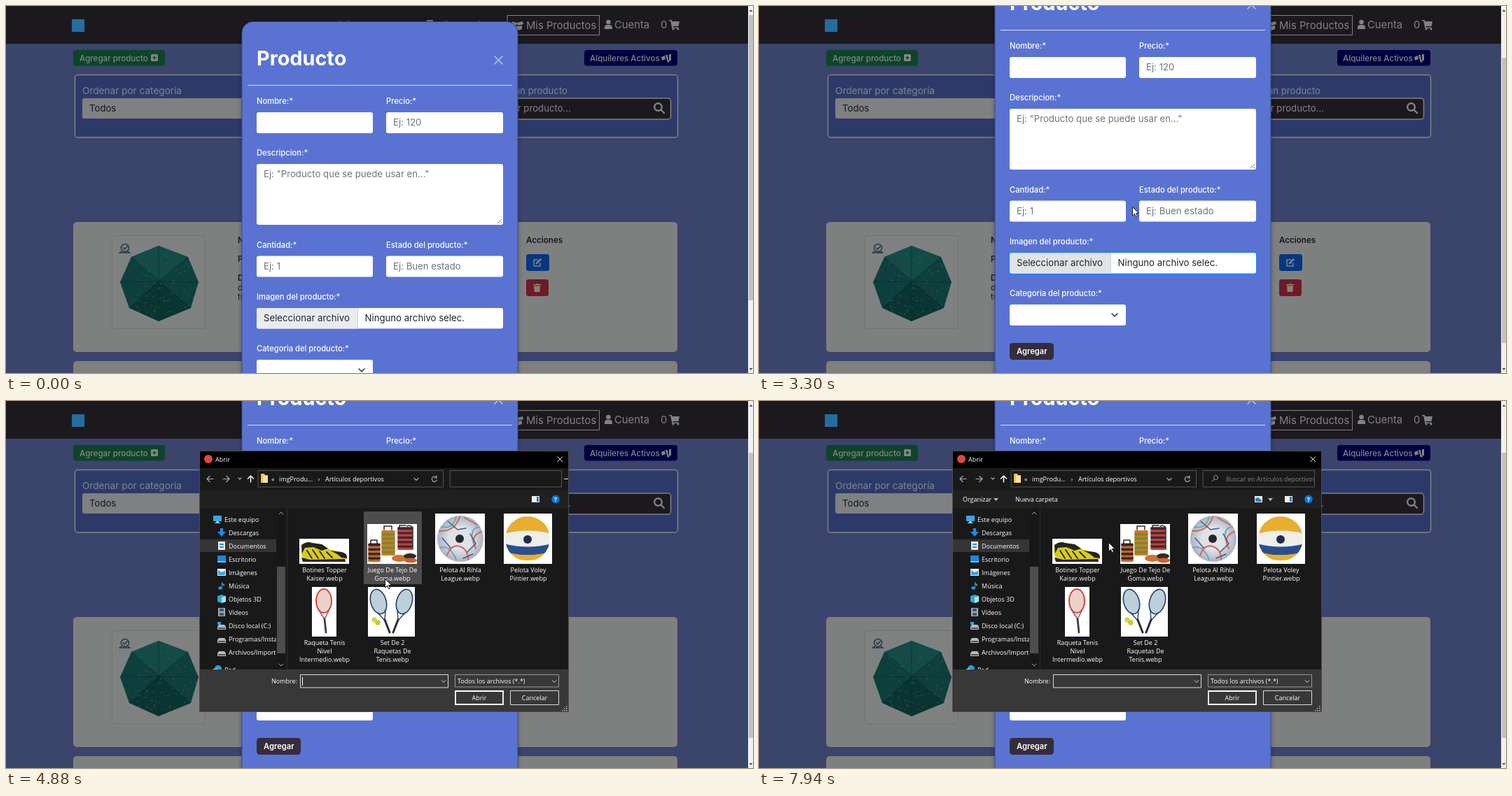
An HTML page for the animation above (8 s loop, 1067 px wide and 525 px high).

```html
<!DOCTYPE html>
<html lang="es">
<head>
<meta charset="utf-8">
<title>Producto</title>
<style>
  html, body { margin: 0; width: 100%; height: 100%; overflow: hidden; background: #3b446b; }
  svg { display: block; }
  text { font-family: Inter, sans-serif; white-space: pre; }
  .nav { font-size: 14.8px; fill: #828183; }
  .pill { font-size: 11.6px; font-weight: 500; fill: #848585; }
  .body { font-size: 13.2px; }
  .label { font-size: 11.2px; font-weight: 500; fill: #fff; }
  .strong { font-size: 11.2px; font-weight: 600; }
  .dialog text { font-family: "Open Sans", sans-serif; font-size: 9px; fill: #fff; }
  .dialog .mid { text-anchor: middle; }
  .line { fill: none; stroke-linecap: round; stroke-linejoin: round; }
</style>
</head>
<body>
<svg width="1067" height="525" viewBox="0 0 1067 525">
  <defs>
    <clipPath id="treeClip"><path d="M277 153h109v231H277z"/></clipPath>
    <clipPath id="searchClip"><path d="M635 99h158v24H635z"/></clipPath>
    <clipPath id="canopy"><path d="M218 343l42 16 15 36-11 37-46 19-42-19-13-37 16-36z"/></clipPath>
    <clipPath id="volleyball"><circle cx="745" cy="197" r="32"/></clipPath>
    <radialGradient id="sphere"><stop offset=".5" stop-color="#dfe2e8"/><stop offset="1" stop-color="#aab1c0"/></radialGradient>
    <filter id="shadow" x="-10%" y="-10%" width="120%" height="120%">
      <feDropShadow dx="0" dy="0" stdDeviation="3" flood-opacity=".35"/>
    </filter>
  </defs>

  <!-- dimmed page -->
  <path fill="#3b446b" d="M0 0h1067v525H0z"/>
  <path fill="#1c191e" d="M0 0h1067v54H0z"/>
  <path fill="#246d9e" d="M94 19h18v18H94z"/>
  <g class="nav">
    <text x="463" y="33">Inicio</text><text x="517" y="33">Productos</text>
    <path d="M601 20h9v14h-9z"/><text x="614" y="33">Mis Alquileres</text>
    <path class="line" stroke="#828183" d="M716.5 13.500h131v28h-131z"/>
    <path d="M723 22l7 2 8-2 1 4-7 2-2-2-2 2-6-2zM725 28l5 1 1-1 1 1 5-1v5l-6 2-6-2z"/>
    <text x="743" y="32.500">Mis Productos</text>
    <circle cx="860.500" cy="23" r="3.300"/><path d="M855 33v-2q0-4 4-4h3q4 0 4 4v2z"/>
    <text x="869" y="32">Cuenta</text><text x="935" y="32">0</text>
    <path d="M947 20h4l.5 2H962l-1.500 7h-8l.3 1.500h8V32h-9.500l-2-10.500h-2z"/>
    <circle cx="953" cy="33" r="1.500"/><circle cx="960" cy="33" r="1.500"/>
  </g>

  <rect x="96" y="63" width="131" height="22.500" rx="4" fill="#0d442a"/>
  <text class="pill" x="105" y="78.500">Agregar producto</text>
  <rect x="207" y="69" width="10" height="10" rx="1.500" fill="#848585"/>
  <path stroke="#0d442a" stroke-width="1.400" d="M212 71.500v5M209.500 74h5"/>
  <rect x="826" y="63" width="133" height="22.500" rx="4" fill="#000040"/>
  <text class="pill" x="834" y="78.500">Alquileres Activos</text>
  <path fill="#848585" d="M936 73l5-2 1 5-5 2zM942 70h3l1 8h-2zM947 69h3v9h-3z"/>
  <circle cx="946" cy="79" r="1.700" fill="#848585"/>

  <rect x="98.500" y="98.500" width="861" height="89.500" rx="4" fill="#2d3a69" stroke="#808285" stroke-width="1.500"/>
  <g class="body">
    <text x="109" y="125.500" fill="#828590" font-size="13.600">Ordenar por categoría</text>
    <rect x="109" y="132" width="340" height="29" rx="3" fill="#7f8081"/>
    <text x="119" y="150.500" fill="#15171a">Todos</text>
    <text x="802" y="125.500" text-anchor="end" fill="#828590">Buscar un producto</text>
    <rect x="640" y="132" width="309.500" height="30" rx="4" fill="#1b181e" stroke="#808184" stroke-width="1.500"/>
    <text x="807" y="151" text-anchor="end" fill="#848486">Buscar producto...</text>
  </g>
  <g class="line" stroke="#848486" stroke-width="2.400"><circle cx="931.500" cy="144.500" r="5.300"/><path d="M936 149l4 4"/></g>

  <g fill="#7e8080">
    <rect x="96" y="309" width="863" height="186" rx="5"/>
    <rect x="96" y="508" width="863" height="30" rx="5"/>
  </g>
  <rect x="151.500" y="328.500" width="133" height="133" rx="3" fill="#7f8181" stroke="#6f7172"/>
  <g clip-path="url(#canopy)">
    <path fill="#0c3f3e" d="M160 340h120v115H160z"/>
    <path fill="#134b48" d="M218 393l-39-34 39-16 42 16z"/>
    <path fill="#083433" d="M218 393l46 39-46 19-42-19z"/>
    <g id="dots"></g>
    <path class="line" stroke="#082e2f" stroke-width=".7" d="M218 343v108M260 359l-84 73M275 395l-112-1M264 432l-85-73"/>
  </g>
  <g class="line" stroke="#243a48" stroke-width="1.500">
    <circle cx="170" cy="346" r="5.500"/><path d="M167.500 346l2 2 3.500-4M165 351l-3 2h15l-3-2"/>
  </g>
  <g class="strong" fill="#15171a">
    <text x="331" y="339">Nombre:</text><text x="331" y="366">Precio:</text><text x="331" y="393">Descripción:</text>
    <text x="743" y="339" font-size="11.600">Acciones</text>
    <g font-weight="400"><text x="331" y="407">de</text><text x="331" y="420">tu</text></g>
  </g>
  <rect x="743" y="355" width="33" height="24" rx="3.500" fill="#07377f"/>
  <g class="line" stroke="#808489" stroke-width="1.500"><path d="M759 363h-5v9h9v-4"/><path stroke-width="2.500" d="M758 368l5.500-5.500"/></g>
  <rect x="743" y="391" width="32" height="24" rx="3.500" fill="#6e1b23"/>
  <path fill="#858081" d="M753 398h4l1-1h2l1 1h3v1.500h-11zM754 400.500h9l-.7 8.500h-7.600z"/>

  <!-- product form -->
  <g id="modal">
    <rect x="337" y="22.500" width="394" height="640" rx="16" fill="#5a73d2" stroke="#394a8b" filter="url(#shadow)"/>
    <text x="358" y="85" font-size="28.800" font-weight="700" fill="#fff">Producto</text>
    <path class="line" stroke="#bdc8ee" stroke-width="1.500" d="M698 72l11 11M709 72l-11 11"/>
    <path stroke="#d5dcf4" d="M345 113.500h378"/>
    <g id="fields"></g>
    <path stroke="#666" stroke-width=".9" d="M702 311l6-6M706 311l2-2"/>
    <rect id="focusRing" x="355.500" y="429.500" width="357" height="34.500" rx="5" fill="#2f7cf8"/>
    <rect x="358" y="432" width="352" height="29.500" rx="3" fill="#fff"/>
    <path id="fileButton" d="M502 432H361q-3 0-3 3v23.500q0 3 3 3h141z"/>
    <path stroke="#ced4da" d="M502.500 432v29.500"/>
    <g class="body" fill="#212529"><text x="368" y="451">Seleccionar archivo</text><text x="512.500" y="451">Ninguno archivo selec.</text></g>
    <path class="line" stroke="#343a40" stroke-width="1.600" d="M504 519l4 4 4-4"/>
    <rect x="358" y="561" width="63" height="24" rx="4.500" fill="#352d3a"/>
    <text class="strong" x="368" y="577" fill="#fff">Agregar</text>
  </g>

  <path fill="#f1f1f1" d="M1060 0h7v525h-7z"/>
  <path id="thumb" fill="#c1c1c1" d="M1061 13h6v408h-6z"/>
  <path fill="#505050" d="M1061.500 8l2.500-3 2.500 3zM1061.500 518l2.500 3 2.500-3z"/>

  <!-- file picker -->
  <g id="dialog" class="dialog">
    <path fill="#202020" stroke="#4b4b4b" d="M276.500 71.500h527v373h-527z"/>
    <path fill="#000" d="M277 72h526v24H277z"/>
    <circle cx="289" cy="83" r="6" fill="#db4b3f"/>
    <text x="299" y="87">Abrir</text>
    <path stroke="#fff" d="M787.500 79.500l7.500 7.500M795 79.500l-7.500 7.500"/>
    <path fill="#383838" d="M277 384h526v60H277z"/>
    <path id="blank" fill="#fff" d="M277 96h526v288H277zM379 394h37v12h-37zM420 391h212v19H420zM641 391h149v18H641zM641 414h70v21h-70zM720 414h70v21h-70zM790 431h13v13h-13z"/>
    <g id="content">
      <path fill="#191919" d="M277 96h526v32H277zM277 153h526v231H277z"/>
      <g class="line" stroke="#aaa" stroke-width="1.200">
        <path d="M296 111.500h-9l4-4m-4 4l4 4M310 111.500h9l-4-4m4 4l-4 4M332 110l2 2 2-2M583 110.500l3 3 3-3"/>
        <path stroke="#fff" stroke-width="1.500" d="M349.500 116v-9l-4 4m4-4l4 4"/>
        <path stroke="#555" stroke-width="1" d="M360.500 99.500h264v23.500h-264zM634.500 99.500h159v23.500h-159z"/>
        <path d="M615 109.500a3.700 3.700 0 1 0 .5 3.500M615 107v3h-3"/>
      </g>
      <path fill="#efc24d" d="M364 104h5l1 2h4v11h-10z"/><path fill="#ffe194" d="M367 107h7v10h-7z"/>
      <text x="379" y="114.500">«</text><text x="390" y="114.500">imgProdu...</text><text x="445.500" y="114.500">›</text>
      <text x="456" y="114.500">Artículos deportivos</text>
      <path fill="#eee" d="M751 136h11v9h-11z"/><path fill="#2980c8" d="M758 137h3v7h-3z"/>
      <circle cx="785" cy="140.500" r="5.800" fill="#0878d8"/><text class="mid" x="785" y="144" font-weight="700">?</text>
      <path id="dash" stroke="#ddd" d="M797 111.500h6"/>
      <g id="toolbar">
        <text x="291" y="144">Organizar</text><path fill="#bbb" d="M335 139h7l-3.500 4zM727 139h7l-3.500 4z"/>
        <text x="366" y="144">Nueva carpeta</text>
        <path fill="#eee" d="M708 136h11v9h-11z"/><path fill="#2980c8" d="M709 139l4-1 5 4v2h-9z"/>
        <g class="line" stroke="#999"><circle cx="652.500" cy="109.500" r="3"/><path d="M650 112l-3 3"/></g>
        <g clip-path="url(#searchClip)"><text x="667" y="114.500" style="fill:#858585">Buscar en Artículos deportivos</text></g>
      </g>
      <path fill="#353535" d="M277 198h109v18H277z"/>
      <g id="tree" clip-path="url(#treeClip)"></g>
      <path fill="#171717" d="M387 153h12v231h-12z"/><path fill="#4d4d4d" d="M387 237h12v124h-12z"/>
      <path class="line" stroke="#aaa" d="M390 162l3-3 3 3M390 376l3 3 3-3"/>
      <path stroke="#2b2b2b" d="M401.500 153v231"/>
      <path id="hover" fill="#4d4d4d" d="M414 158h83v104h-83z"/>

      <path fill="#fff" d="M419 197h71v36h-71zM516 176h71v57h-71zM613 161h71v72h-71zM711 161h69v72h-69zM437 266h35v71h-35zM517 266h67v71h-67z"/>

      <!-- football boot -->
      <path fill="#d8cc1c" d="M422 206q8-6 15-3l14 2q12 10 28 11 9 2 8 9l-3 4h-58q-6-9-4-23z"/>
      <path fill="#24251f" d="M422 206q8-6 15-3l14 2 9 6-9 3-12-5-12 1-4 8zM463 214l16 2q9 2 8 9l-8-1q-6-6-16-10zM422 224l12 3 50-1 1 4h-61z"/>
      <path class="line" stroke="#24251f" stroke-width="1.800" d="M430 214l7 11M438 213l8 12M448 215l7 10M458 216l8 8"/>

      <!-- disc stacks -->
      <g id="discs"></g>
      <path class="line" stroke="#2b2727" stroke-width="1.500" d="M521 205v-6h9v6M540 184v-5h11v5M581 212v-31q-3-4-8-2M562 181v-3h9"/>
      <ellipse cx="562" cy="225" rx="11" ry="5" fill="#cf7430"/><ellipse cx="577" cy="222" rx="9" ry="4" fill="#302a29"/>
      <ellipse cx="578" cy="228" rx="9" ry="3.500" fill="#c9622d"/>

      <!-- balls -->
      <circle cx="649" cy="197" r="33" fill="url(#sphere)"/>
      <g class="line" stroke-width="2">
        <path stroke="#6aa9c4" d="M622 180q16 4 21-14M676 180q-14 2-9 21M620 210q14-5 23 17"/>
        <path stroke="#cf6a50" d="M619 186q22 1 29-20M679 187q-17 6-8 24M630 221q6-17 18-13t12 19M655 167l18 10"/>
        <path stroke="#4c5680" stroke-width="1.500" d="M631 172l14 12 12-2M623 196l12 14M663 190l8 14-12 12M653 225l14-6"/>
      </g>
      <circle cx="648" cy="197" r="6" fill="#252729"/>
      <g clip-path="url(#volleyball)">
        <path fill="#eeeeea" d="M711 161h69v72h-69z"/>
        <path fill="#e8ae2f" d="M711 161h69v29q-35-9-69 0z"/>
        <path fill="#2b4f8e" d="M711 204q34 9 69 0v12q-35 9-69 0z"/>
        <path fill="#e8ae2f" d="M718 217q27 7 54 0l-8 9q-19 4-38 0z"/>
        <path class="line" stroke="#c3b48e" stroke-width=".7" d="M725 164q-6 12-5 23M766 164q6 12 5 23"/>
      </g>
      <circle cx="745" cy="198" r="6" fill="#202b4e"/>

      <!-- rackets -->
      <g class="line">
        <ellipse cx="454" cy="286" rx="11" ry="17" fill="#ecd0ca" stroke="#cb4c42" stroke-width="2"/>
        <path stroke="#b84844" stroke-width="1.500" d="M446 298l9 14 7-14"/><path stroke="#343f58" stroke-width="2.800" d="M455 312l2 19"/>
        <g id="racket">
          <ellipse cx="532" cy="287" rx="11" ry="18" transform="rotate(-16 532 287)" fill="#bdd0d9" stroke="#2b466f" stroke-width="1.700"/>
          <path stroke="#2b466f" stroke-width="1.500" d="M531 303l10 11 1-15"/><path stroke="#252c39" stroke-width="3" d="M541 313l7 18"/>
        </g>
        <use href="#racket" transform="matrix(-1 0 0 1 1101 0)"/>
      </g>
      <circle cx="526" cy="313" r="3.700" fill="#d5d838"/><circle cx="531" cy="317" r="3.700" fill="#c6cd2c"/>
      <g id="names"></g>

      <text x="379" y="404">Nombre:</text>
      <g fill="none" stroke="#ddd">
        <path fill="#383838" d="M420.500 391.500h211v18.500h-211z"/><path stroke="#999" d="M641.500 391.500h148v17.500h-148z"/>
        <path stroke="#fff" stroke-width="1.800" d="M642 415h68v19h-68z"/><path d="M720.500 414.500h69v20h-69z"/>
        <path d="M622 399.500l3 3 3-3M780 399.500l3 3 3-3"/>
      </g>
      <text x="645" y="404">Todos los archivos (*.*)</text>
      <text class="mid" x="676" y="428">Abrir</text><text class="mid" x="755" y="428">Cancelar</text>
      <path fill="#bbb" d="M800 436h1.500v1.500H800zM797 439h1.500v1.500H797zM800 439h1.500v1.500H800zM794 442h1.500v1.500H794zM797 442h1.500v1.500H797zM800 442h1.500v1.500H800z"/>
      <path id="caret" stroke="#fff" d="M423.500 395v12"/>
    </g>
  </g>
  <path id="cursor" fill="#fff" stroke="#111" stroke-width=".9" d="M.5.500v12.500l2.900-2.700 2.100 4.600 2-.9-2.100-4.500h4z"/>
</svg>
<script>
const LOOP = 8000;
const $ = id => document.getElementById(id);
const add = (id, items, draw) => { $(id).innerHTML = items.map(draw).join(''); };

let seed = 7;
const random = () => (seed = seed * 16807 % 2147483647) / 2147483647;
add('dots', Array.from({ length: 160 }), (_, i) =>
  `<circle cx="${162 + random() * 114}" cy="${343 + random() * 108}" r="${.5 + random() * .6}" fill="${['#553c31', '#2b5f59', '#54503f'][i % 3]}"/>`);

// label, x, y of the label baseline, control width, control height, placeholder
add('fields', [
  ['Nombre:*', 358, 140, 166, 30, ''],
  ['Precio:*', 543, 140, 167, 30, 'Ej: 120'],
  ['Descripcion:*', 358, 214, 352, 87, 'Ej: "Producto que se puede usar en..."'],
  ['Cantidad:*', 358, 345.5, 166, 30, 'Ej: 1'],
  ['Estado del producto:*', 543, 345.5, 167, 30, 'Ej: Buen estado'],
  ['Imagen del producto:*', 358, 420, 0, 0, ''],
  ['Categoria del producto:*', 358, 494, 166, 30, '']
], ([label, x, y, w, h, hint]) => `<text class="label" x="${x}" y="${y}">${label}</text>
  <rect x="${x}" y="${y + 12}" width="${w}" height="${h}" rx="3" fill="#fff"/>
  <text class="body" x="${x + 10}" y="${y + 31}" fill="#6c757d">${hint}</text>`);

const monitor = '<path fill="#3ba5e8" d="M0 1h12v8H0z"/><path fill="#9bcdea" d="M4 9h4v2h2v1H2v-1h2z"/>';
const drive = '<path fill="#bbb" d="M2 5h8l2 3v4H0V8z"/><path fill="#555" d="M1 9h10v2H1z"/>';
add('tree', [
  ['Este equipo', monitor],
  ['Descargas', '<path fill="#208ce8" d="M4 0h4v5h4l-6 7-6-7h4z"/>'],
  ['Documentos', '<path fill="#e8edf1" d="M1 0h10v12H1z"/><path fill="#398dc3" d="M3 3h6v2H3zM3 7h6v2H3z"/>'],
  ['Escritorio', '<path fill="#1688df" d="M0 1h12v10H0z"/><path fill="#65c2fa" d="M0 9h12v2H0z"/>'],
  ['Imágenes', '<path fill="#eee" d="M0 1h12v10H0z"/><path fill="#3ba4dd" d="M1 3l5 3 5-2v6H1z"/>'],
  ['Música', '<path fill="#2796e8" d="M6 0q1 3 4 4v3L7 5v5a3 2 0 1 1-1-2z"/>'],
  ['Objetos 3D', '<path fill="#31a9d2" d="M0 2l6-2 6 2v8l-6 2-6-2z"/><path fill="#a5e4ef" d="M6 4l6-2v8l-6 2z"/>'],
  ['Vídeos', '<path fill="#aaa" d="M1 0h10v12H1z"/><path fill="#345982" d="M3 1h6v4H3zM3 7h6v4H3z"/>'],
  ['Disco local (C:)', drive + '<path fill="#28a4e2" d="M0 1h5v4H0z"/>'],
  ['Programas/Insta', drive],
  ['Archivos/Import', drive],
  ['Red', '<circle cx="7" cy="5" r="5" fill="#3a99db"/><path fill="#ccc" d="M0 5h6v5H0z"/>']
], ([name, icon], i, all) => {
  const root = i === 0 || i === all.length - 1;
  const y = 163 + 19 * i + (i === all.length - 1 ? 6 : 0);
  return `<g transform="translate(${root ? 296 : 302} ${y})">${icon}<text x="16" y="9.500">${name}</text></g>`;
});

// left, bottom, width, disc count, alternating colours
add('discs', [
  [517, 230, 18, 8, '#c9622d', '#2d2a28'],
  [536, 221, 20, 11, '#cc792d', '#708b32'],
  [559, 213, 22, 10, '#c4413e', '#3c2730']
], ([x, bottom, width, count, ...colors]) => Array.from({ length: count }, (_, i) =>
  `<rect x="${x}" y="${bottom - 4 - i * 3.2}" width="${width}" height="4" rx="2" fill="${colors[i % 2]}"/>`).join(''));

add('names', [
  [455, 245, 'Botines Topper', 'Kaiser.webp'],
  [552, 245, 'Juego De Tejo De', 'Goma.webp'],
  [649, 245, 'Pelota Al Rihla', 'League.webp'],
  [746, 245, 'Pelota Voley', 'Pintier.webp'],
  [455, 349, 'Raqueta Tenis', 'Nivel', 'Intermedio.webp'],
  [552, 349, 'Set De 2', 'Raquetas De', 'Tenis.webp']
], ([x, y, ...lines]) => lines.map((line, i) => `<text class="mid" x="${x}" y="${y + 12 * i}">${line}</text>`).join(''));

// time, x, y
const path = [
  [130, 978, 495], [450, 740, 290], [720, 579, 165], [880, 597, 168], [1000, 685, 170], [1280, 569, 146],
  [1540, 569, 146], [1680, 555, 136], [2000, 557, 138], [2310, 600, 306], [2450, 626, 335], [2750, 448, 377],
  [3050, 478, 346], [3200, 478, 346], [3300, 533, 287], [3550, 537, 256], [3980, 533, 254], [4070, 534, 250],
  [4270, 541, 257], [4750, 541, 257], [4880, 541, 254], [5570, 541, 254], [6250, 678, 222], [6380, 682, 219],
  [6590, 735, 205], [7450, 735, 205], [7940, 499, 202], [8000, 499, 202]
];
const progress = (t, from, to) => Math.min(1, Math.max(0, (t - from) / (to - from)));
const show = (id, on) => $(id).setAttribute('visibility', on ? 'inherit' : 'hidden');
const move = (id, x, y) => $(id).setAttribute('transform', `translate(${x} ${y})`);

function pointer(t) {
  const next = Math.max(1, path.findIndex(p => p[0] > t));
  const [t0, x0, y0] = path[next - 1], [t1, x1, y1] = path[next];
  const k = progress(t, t0, t1);
  return [x0 + (x1 - x0) * k, y0 + (y1 - y0) * k];
}

function draw(t) {
  const [x, y] = pointer(t);
  move('cursor', x, y);
  show('cursor', t >= 130);

  const scroll = 1 - (1 - progress(t, 1750, 1960)) ** 2;
  move('modal', 0, -79 * scroll);
  move('thumb', 0, 61 * scroll);
  $('focusRing').setAttribute('opacity', progress(t, 2950, 3230));
  const shade = progress(t, 2520, 2670) - progress(t, 3240, 3420);
  $('fileButton').setAttribute('fill', `rgb(${233 - 12 * shade} ${236 - 12 * shade} ${239 - 12 * shade})`);

  const loaded = t >= 4750, complete = t >= 4950;
  show('dialog', t >= 4420);
  show('blank', t >= 4420 && !loaded);
  show('content', loaded);
  show('toolbar', complete);
  show('dash', loaded && !complete);

  const column = Math.floor((x - 414) / 97);
  show('hover', loaded && (x - 414) % 97 <= 83 && y >= 158 && y < 262);
  move('hover', column * 97, 0);
  show('caret', loaded && (t < 5460 || Math.floor((t - 5460) / 530) % 2 === 1));
}

const start = performance.now();
function tick() {
  draw((performance.now() - start) % LOOP);
  requestAnimationFrame(tick);
}
tick();
</script>
</body>
</html>
```
